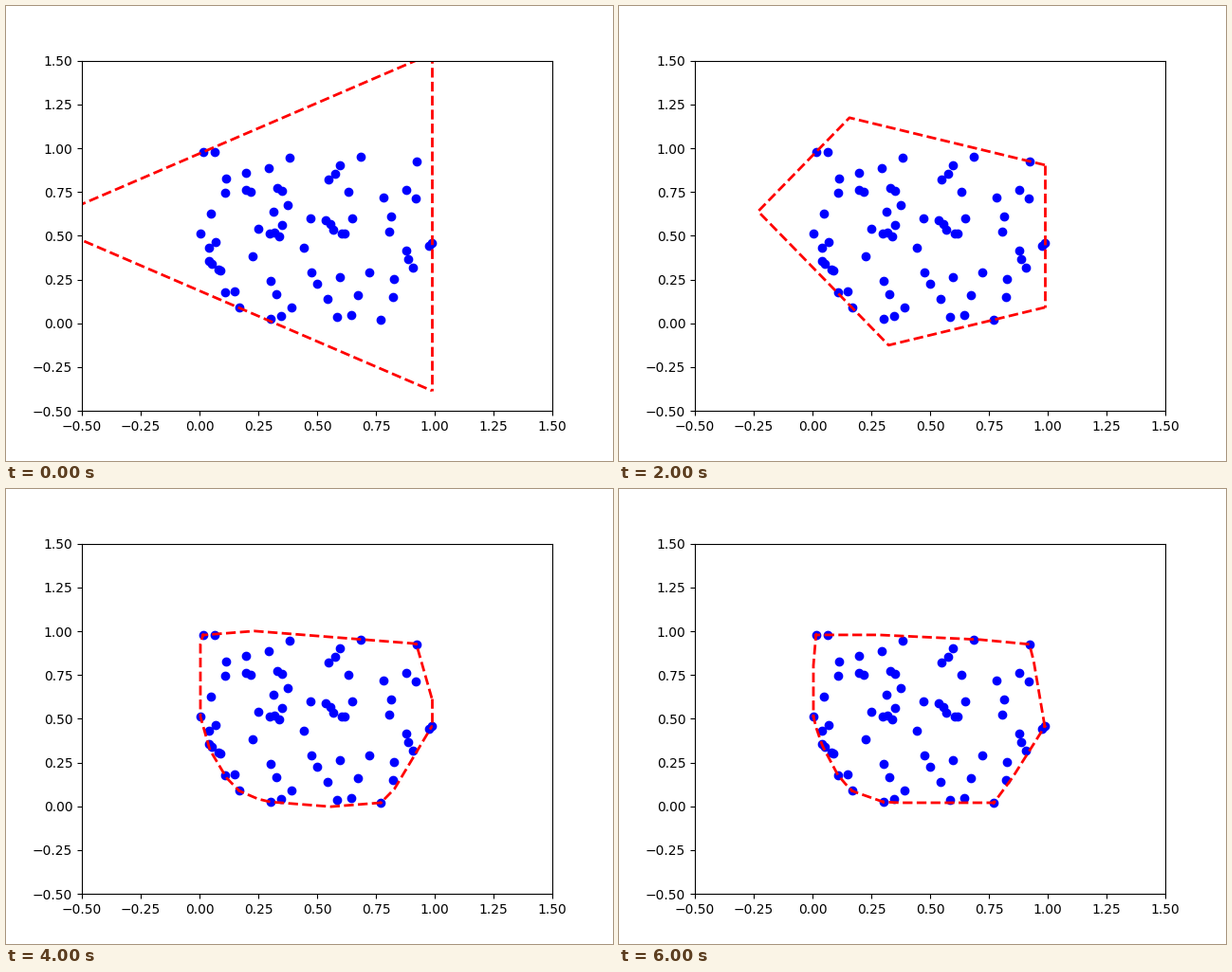
A matplotlib script that plays this animation: 640 by 480 pixels, repeating every 7 s.

```python
import numpy as np
import matplotlib.pyplot as plt
from matplotlib.animation import FuncAnimation

# Number of supporting half-planes around the cloud at each step
SIDES = [3, 4, 5, 10, 30, 50, 100]

points = np.random.RandomState(10).rand(70, 2)


def outer_polygon(sides):
    """Corners of the polygon bounded by equally spaced supporting lines."""
    angles = 2 * np.pi * np.arange(sides) / sides
    normals = np.column_stack([np.cos(angles), np.sin(angles)])
    reach = (normals @ points.T).max(axis=1)
    corners = []
    for i in range(sides):
        pair = [i, (i + 1) % sides]
        corners.append(np.linalg.solve(normals[pair], reach[pair]))
    return np.array(corners)


fig, ax = plt.subplots(figsize=(6.4, 4.8), dpi=100)
ax.set_xlim(-0.5, 1.5)
ax.set_ylim(-0.5, 1.5)
ax.plot(points[:, 0], points[:, 1], "bo")
outline, = ax.plot([], [], "r--", linewidth=2)
closing, = ax.plot([], [], "r--", linewidth=2)


def update(sides):
    corners = outer_polygon(sides)
    outline.set_data(*corners.T)
    # The closing edge has its own dash phase, starting at the first corner
    closing.set_data(*corners[[0, -1]].T)
    return outline, closing


def init():
    return update(SIDES[0])


anim = FuncAnimation(fig, update, frames=SIDES, init_func=init,
                     interval=1000, repeat=True)
plt.show()
```
